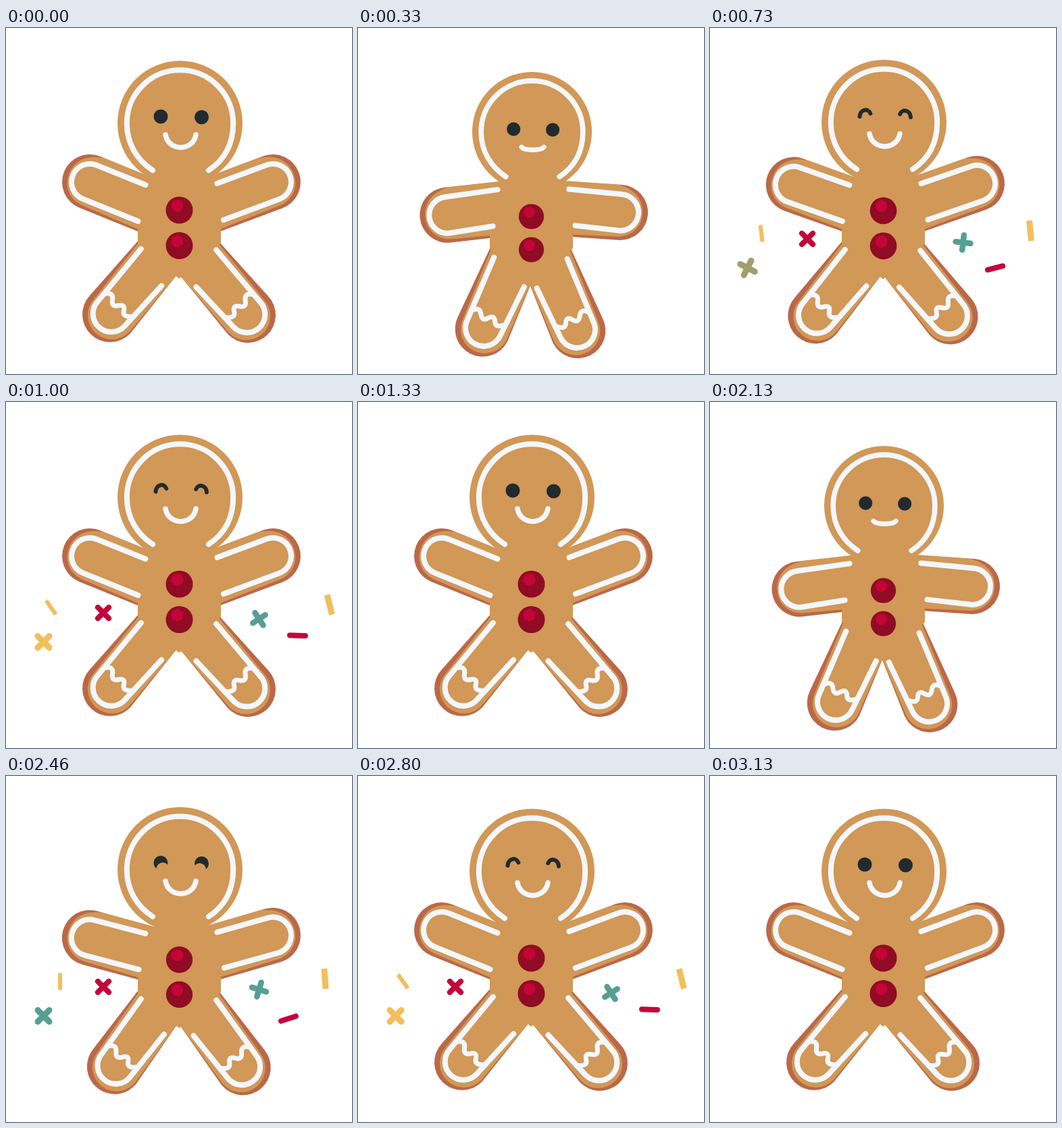
Write an HTML page with a canvas that moves like this. It is 512 px wide and 512 px high and loops after 3260 ms.

```html
<!DOCTYPE html>
<html>
<head>
<meta charset="utf-8">
<title>Gingerbread dance</title>
<style>
html, body { margin: 0; width: 100%; height: 100%; overflow: hidden; background: #fff; }
canvas { display: block; width: 100vmin; height: 100vmin; }
</style>
</head>
<body>
<canvas id="stage" width="512" height="512"></canvas>
<script>
const ctx = document.getElementById('stage').getContext('2d');
const DOUGH = '#d19857', CRUST = '#bb6848', ICING = '#f3f7fc', INK = '#212a2f';
const RED = '#c3063a', TEAL = '#559f93', OLIVE = '#a09e6c', YELLOW = '#f3be5c';
const LOOP = 3260, DANCE = 1800, STEP = 200 / 3;
const rad = Math.PI / 180;

// Limbs are drawn with the rounded end at the origin.
const ARM = {
  crust: new Path2D('M100-40L0-41A41 41 0 0 0 0 41H100Z'),
  dough: new Path2D('M100-41H10C-18-38-33-22-33 0-33 20-18 35 2 36L100 38Z')
};
const LEG = {
  crust: new Path2D('M-45-131L-41 0A41 41 0 0 0 41 0L32.5-105V-131Z'),
  dough: new Path2D('M-44-131L-33 0A35.5 35.5 0 0 0 38.5-2L32.3-105V-131Z'),
  icing: new Path2D('M-33-102L-26.5-2A27 27 0 0 0 27.5-2L26.5-83'),
  wave: new Path2D('M-25-19Q-18-27-12-18T0-18 11-18 26-20')
};
const HEAD_ICING = new Path2D('M-40.5 69.5C-64 54-78.7 30-78.7 0A78.7 78.7 0 0 1 78.7 0C78.7 30 66 54 42.5 69.5');
const EYE_ARC = new Path2D('M-7.5 1.5C-7-9 5-11.5 8.3-3');

// x, y, drift x, drift y, angle, spin, half length, width, colour, crossed
const CONFETTI = [
  [80, 304, -4, 0, 90, -7, 12.5, 6, YELLOW, false],
  [144, 312, 0, 0, 45, 0, 11.5, 8, RED, true],
  [55.5, 355, 0, 0, 45, -18, 12, 9, TEAL, true],
  [374.5, 316, 0, 1.5, 17, -10, 11, 8.5, TEAL, true],
  [418, 359, 4, -4, -18, 4, 11.5, 8, RED, false],
  [472, 300, 2, 0, 86, -2, 15, 9, YELLOW, false]
];

// Head bounce over the steps of the dance: [step, amount]
const HEAD_KEYS = [[0, 0], [2, .25], [4, .85], [5, 1], [6, .9], [8, .1], [9, -.2], [10, -.2], [11, -.12], [12, 0], [20, 0]];

function sample(keys, n) {
  const i = Math.max(1, keys.findIndex(k => k[0] >= n));
  const [a, va] = keys[i - 1], [b, vb] = keys[i];
  return va + (vb - va) * (n - a) / (b - a);
}

function at(x, y, angle, flip, draw) {
  ctx.save();
  ctx.translate(x, y);
  ctx.scale(flip, 1);
  ctx.rotate(angle * rad);
  draw();
  ctx.restore();
}

function fill(path, color) {
  ctx.fillStyle = color;
  ctx.fill(path);
}

function stroke(path, color, width) {
  ctx.strokeStyle = color;
  ctx.lineWidth = width;
  ctx.stroke(path);
}

function disc(x, y, r, color) {
  const path = new Path2D();
  path.arc(x, y, r, 0, 7);
  fill(path, color);
}

// Each limb swings around its joint.
function limbs(bend) {
  const late = bend ** 1.2;
  const arm = (px, py, angle, flip) => ({
    shape: ARM, angle, flip,
    x: px - flip * 100 * Math.cos(angle * rad),
    y: py - 100 * Math.sin(angle * rad)
  });
  const leg = (px, py, angle, flip) => ({
    shape: LEG, angle, flip,
    x: px - flip * 131.5 * Math.sin(angle * rad),
    y: py + 131.5 * Math.cos(angle * rad)
  });
  return [
    leg(244, 328, 43.2 - 16.4 * bend, 1),
    leg(267, 330, 43.8 - 17.5 * bend, -1),
    arm(216.7 + 15 * bend, 265.5, 22 - 28.5 * bend, 1),
    arm(301.3 - 13 * late, 263 + 3 * late, 20.5 - 24.5 * late, -1)
  ];
}

function ice(limb, bend) {
  at(limb.x, limb.y, limb.angle, limb.flip, () => {
    if (limb.shape === LEG) {
      stroke(LEG.icing, ICING, 8);
      stroke(LEG.wave, ICING, 7);
    } else {
      const end = 88 - 23 * bend;
      const line = new Path2D(`M78-${27 + 2 * bend}L0-27A27 27 0 0 0 0 27L${end} ${27 - 3 * bend}`);
      stroke(line, ICING, 8);
    }
  });
}

function eye(x, y, flip, n) {
  at(x, y, 0, flip, () => {
    if (n > 10 && n < 16) return stroke(EYE_ARC, INK, 6);
    disc(0, 0, 10.5, INK);
    if (n === 10 || n === 16) disc(3, 9, 9.5, DOUGH);
  });
}

function head(n) {
  const bob = sample(HEAD_KEYS, n), dip = Math.max(0, bob);
  const size = 1 - .043 * dip;
  ctx.save();
  ctx.translate(257.5, 141 + 12.5 * bob);
  ctx.scale(size, size);
  disc(0, 0, 92.5, DOUGH);
  stroke(HEAD_ICING, ICING, 8);
  eye(-28.5, -10 + 6 * dip, 1, n);
  eye(32, -9 + 6 * dip, -1, n);
  const left = -21.5 + 5.3 * dip, right = 23.5 - 5.2 * dip;
  const top = 17 + 6.8 * dip, low = top + 25 - 19.4 * dip;
  stroke(new Path2D(`M${left} ${top}C${left + 4.5} ${low} ${right - 4.5} ${low} ${right} ${top}`), ICING, 7.5);
  ctx.restore();
}

function button(y, r) {
  disc(256.5, y, r, '#8f0c24');
  disc(253.5, y - r * .33, r * .45, '#c40535');
}

function confetti(n) {
  const size = n < 9 || n > 17 ? 0 : n === 9 || n === 16 ? .6 : n === 17 ? .3 : 1;
  if (!size) return;
  const k = n - 10, drift = (1 - .8 ** k) / .2;
  CONFETTI.forEach(([x, y, dx, dy, angle, spin, half, width, color, crossed], i) => {
    if (i === 2 && n > 10) color = n === 11 ? OLIVE : YELLOW;
    at(x + dx * drift, y + dy * drift, angle + spin * k, 1, () => {
      ctx.scale(size, size);
      ctx.lineCap = color === YELLOW && !crossed ? 'butt' : 'round';
      const bar = `M${-half} 0H${half}`;
      stroke(new Path2D(crossed ? `${bar}M0 ${-half}V${half}` : bar), color, width);
    });
  });
}

function frame(now) {
  const t = now % LOOP % DANCE;
  const n = Math.min(20, Math.floor((t + 7) / STEP));
  const bend = Math.max(0, 1 - Math.abs(n - 6) / 6) ** 1.55 / .755;
  const parts = limbs(bend);

  ctx.fillStyle = '#fff';
  ctx.fillRect(0, 0, 512, 512);
  ctx.lineCap = ctx.lineJoin = 'round';
  for (const [layer, color] of [['crust', CRUST], ['dough', DOUGH]])
    for (const p of parts)
      at(p.x, p.y, p.angle, p.flip, () => fill(p.shape[layer], color));

  at(0, 8 * bend, 0, 1, () =>
    fill(new Path2D('M206 221H308L318 262V318L256 371 195 318V262Z'), DOUGH));
  head(n);
  parts.forEach(p => ice(p, bend));
  button(269.5 + 9.5 * bend, 20 - 1.4 * bend);
  button(322 + 6 * bend, 20 - 1.4 * bend);
  confetti(n);
}

let start;
function tick(now) {
  start ??= now;
  frame(now - start);
  requestAnimationFrame(tick);
}
requestAnimationFrame(tick);
</script>
</body>
</html>
```
